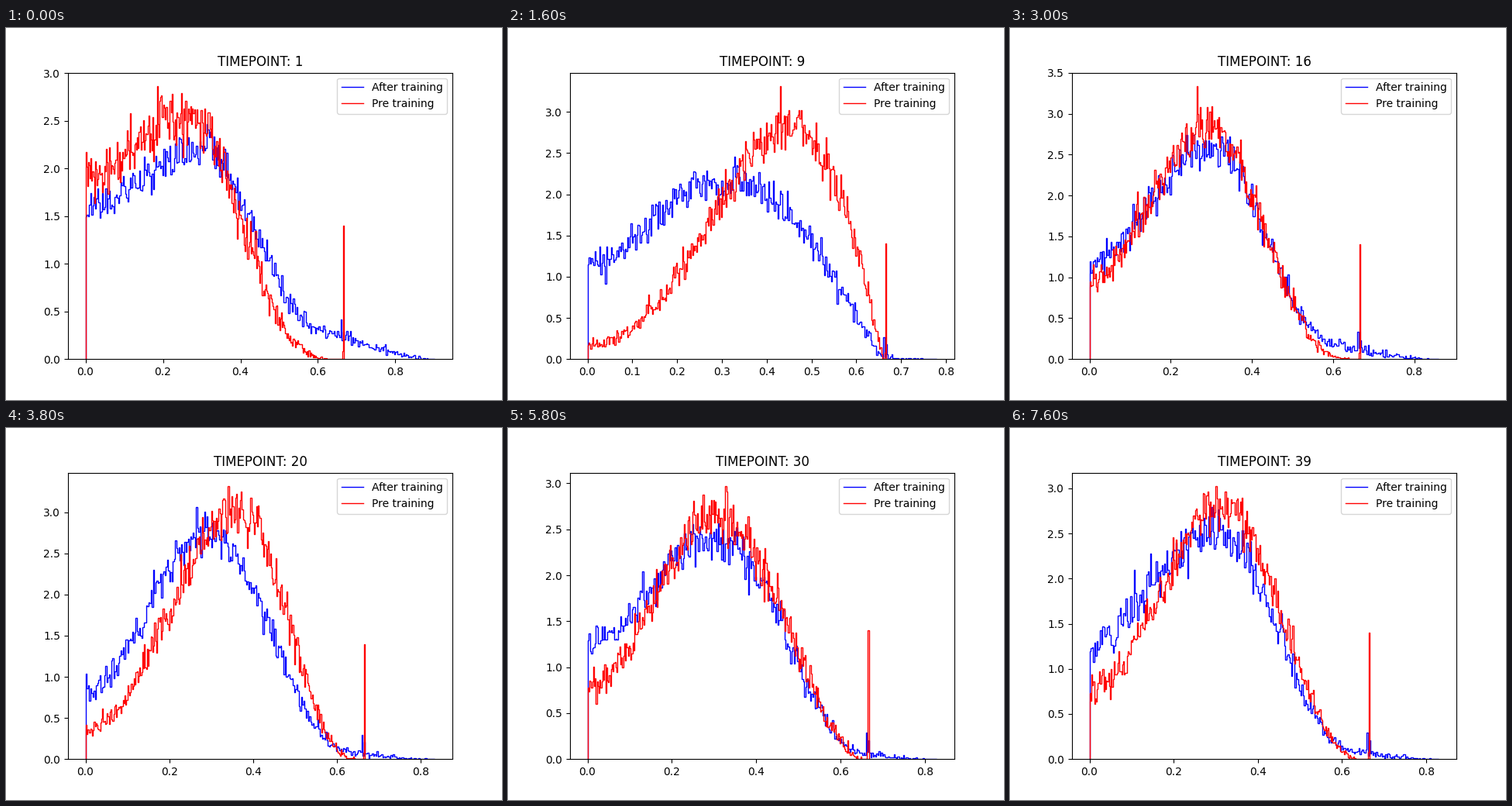
Write a matplotlib script that moves like this. It is 640x480 px and loops after 7800 ms.

```python
import numpy as np
import matplotlib.pyplot as plt
from matplotlib.animation import FuncAnimation
from matplotlib.lines import Line2D

FRAMES, INTERVAL = 39, 200
BINS, SAMPLES = 300, 50000
PRE_MAX, BODY_END = 0.667, 0.66
AFTER_MODE = 0.285

# timepoint, x range, tallest bin, pre start, pre mode, falloff, after start
KEYS = np.array([
    [1, .902, 2.863, 1.90, .25, 3.85, 1.62],
    [9, .780, 3.310, 0.17, .46, 1.10, 1.17],
    [16, .861, 3.335, 0.95, .29, 3.60, 1.18],
    [20, .834, 3.315, 0.35, .36, 3.10, 0.82],
    [26, .773, 2.943, 0.35, .31, 1.50, 1.08],
    [34, .884, 2.993, 1.22, .29, 2.90, 1.40],
    [39, .831, 3.024, 0.75, .315, 3.00, 1.25],
])


def bins(xmax):
    edges = np.linspace(0, xmax, BINS + 1)
    return edges, edges[:-1] + edges[1] / 2


def density(x, start, mode, fall, tail=0):
    """Smooth rise from start to the mode, then a fall to BODY_END; unit area."""
    t = np.clip(x / mode, 0, 1) ** (mode + 0.7)
    rise = t * t * (3 - 2 * t)
    u = np.clip((x - mode) / (BODY_END - mode), 0, 1)
    hump = rise * (1 - u * u) ** fall
    base = start * (1 - rise) + tail
    width = x[1] - x[0]
    return base + hump * (1 / width - base.sum()) / hump.sum()


def sample(curve, width, rng):
    """Histogram heights with counting noise."""
    scale = SAMPLES * width
    return rng.poisson(curve * scale) / scale


def pre_hist(start, mode, fall, peak, rng):
    edges, x = bins(PRE_MAX)
    heights = sample(density(x, start, mode, fall), edges[1], rng)
    top = heights.argmax()
    heights = np.minimum(heights, 0.98 * peak)
    heights[top] = peak
    heights[-2:] = 0.08, 1.4
    return heights, edges


def after_hist(xmax, start, fall, rng):
    edges, x = bins(xmax)
    level = 0.08 + 0.3 * ((xmax - 0.77) / 0.13) ** 2
    u = np.clip((x - AFTER_MODE) / (xmax - AFTER_MODE), 0, 1)
    tail = level * 6.75 * u * (1 - u) ** 2
    curve = density(x, start, AFTER_MODE, 1.12 * fall, tail)
    heights = sample(curve, edges[1], rng)
    bump = 0.22 + level / 2
    heights[int(0.661 / edges[1])] = bump
    heights[int(0.6665 / edges[1])] = 0.7 * bump
    return heights, edges


fig, ax = plt.subplots(figsize=(6.4, 4.8), dpi=100)
flat = np.zeros(BINS), np.linspace(0, 1, BINS + 1)
after = ax.stairs(*flat, color="blue", lw=1)
pre = ax.stairs(*flat, color="red", lw=1)
ax.legend([Line2D([], [], color=c, lw=1) for c in ("blue", "red")],
          ["After training", "Pre training"], loc="upper right")


def update(i):
    t = i + 1
    rng = np.random.default_rng(100 + t)
    xmax, peak, pre_start, mode, fall, after_start = (
        np.interp(t, KEYS[:, 0], col) for col in KEYS[:, 1:].T)
    pre.set_data(*pre_hist(pre_start, mode, fall, peak, rng))
    after.set_data(*after_hist(xmax, after_start, fall, rng))
    ax.set_xlim(-0.05 * xmax, 1.05 * xmax)
    ax.set_ylim(0, 1.05 * peak)
    ax.set_title(f"TIMEPOINT: {t}")
    return after, pre


anim = FuncAnimation(fig, update, frames=FRAMES, interval=INTERVAL,
                     init_func=lambda: update(0), repeat=True, repeat_delay=0)
plt.show()
```
